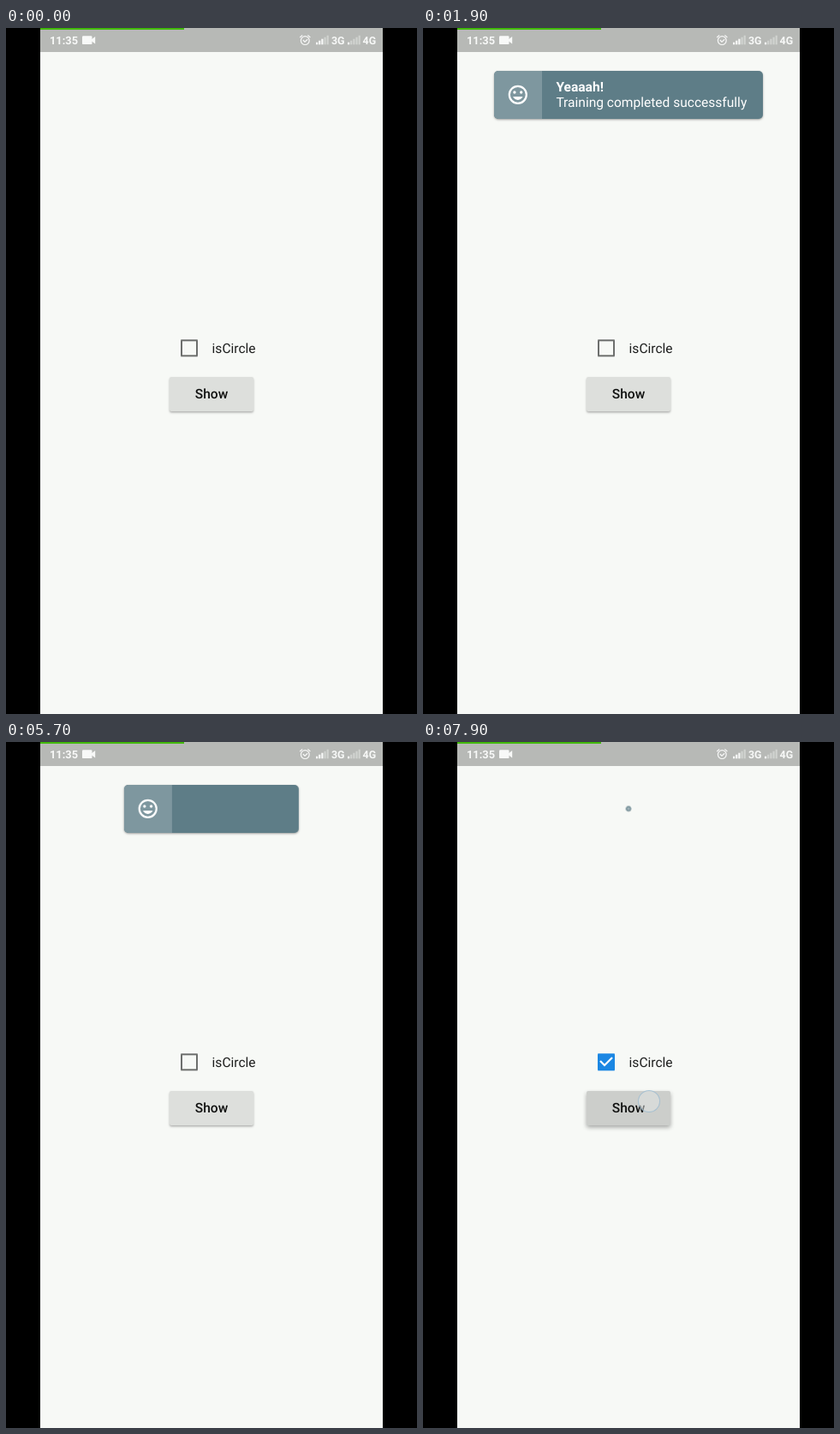
An HTML page for the animation above (8 s loop, 480 px wide and 800 px high).

```html
<!DOCTYPE html>
<html lang="en">
<head>
<meta charset="utf-8">
<title>Achievement popup</title>
<style>
  html, body { margin: 0; width: 100%; height: 100%; overflow: hidden; background: #000; }
  #stage {
    --loop: 8000ms linear infinite;
    position: absolute; left: 0; top: 0; width: 480px; height: 800px; overflow: hidden; background: #000;
    font: 15.556px/18.23px Roboto, sans-serif; color: #1d1e1d; text-rendering: geometricPrecision;
  }
  #stage div { position: absolute; box-sizing: border-box; white-space: nowrap; }
  #stage svg { position: absolute; left: 0; top: 0; }
  #page { left: 40px; top: 0; width: 400px; height: 800px; background: #f7f9f6; }

  #label { left: 240.6px; top: 365px; }
  #box {
    left: 204px; top: 363px; width: 20px; height: 20px; border-radius: 1px;
    border: 2.2px solid #6d6f6d; animation: fill var(--loop);
  }
  #stage #check { left: 204px; top: 363.3px; animation: draw var(--loop); }
  #button {
    left: 191px; top: 406.8px; width: 98px; height: 40px; border-radius: 2px;
    font-weight: 500; line-height: 40px; text-align: center; color: #111211;
    animation: press var(--loop);
  }

  .touch {
    width: 26px; height: 26px; border-radius: 50%; opacity: 0;
    border: 1.5px solid rgba(140, 178, 205, .65); background: rgba(226, 230, 229, .5);
  }
  #tapShow { left: 251px; top: 406px; animation: tapShow var(--loop); }
  #tapBox { left: 203px; top: 358px; animation: tapBox var(--loop); }

  #popup {
    left: 240px; top: 50px; height: 55.6px; background: #5e7d87; color: #fff;
    box-shadow: 0 1px 2.5px rgba(0, 0, 0, .36);
    animation: scale var(--loop), size var(--loop), shape var(--loop);
  }
  #face {
    left: 0; top: 0; width: 55.6px; height: 55.6px; background: #7e979f;
    animation: faceShape var(--loop);
  }
  #title, #subtitle { left: 72.4px; opacity: 0; }
  #title { top: 9.6px; font-weight: 700; animation: title var(--loop); }
  #subtitle { top: 27.8px; animation: subtitle var(--loop); }

  @keyframes scale {
    0%, 7.2% { transform: translateX(-50%) scale(0); animation-timing-function: cubic-bezier(.4, 0, .2, 1); }
    10.3% { transform: translateX(-50%) scale(1); animation-timing-function: linear; }
    73.8% { transform: translateX(-50%) scale(1); animation-timing-function: cubic-bezier(.8, 0, .6, 1); }
    76.9% { transform: translateX(-50%) scale(0); }
    98.25% { transform: translateX(-50%) scale(0); animation-timing-function: ease-in; }
    100% { transform: translateX(-50%) scale(.85); }
  }
  @keyframes size {
    0% { width: 55.6px; }
    10.45% { width: 55.6px; animation-timing-function: cubic-bezier(.4, 0, .2, 1); }
    16.7% { width: 314px; animation-timing-function: linear; }
    67.4% { width: 314px; animation-timing-function: cubic-bezier(.8, 0, .6, 1); }
    73.65%, 100% { width: 55.6px; }
  }
  @keyframes shape {
    0%, 90% { border-radius: 5px; }
    90.01%, 100% { border-radius: 28px; }
  }
  @keyframes faceShape {
    0%, 90% { border-radius: 5px 0 0 5px; }
    90.01%, 100% { border-radius: 28px; }
  }
  @keyframes title {
    0%, 16.75% { opacity: 0; transform: translateY(11.1px); }
    19.9%, 63.9% { opacity: 1; transform: none; }
    67%, 100% { opacity: 0; transform: translateY(11.1px); }
  }
  @keyframes subtitle {
    0%, 19.95% { opacity: 0; transform: translateY(11.1px); }
    23.1%, 60.62% { opacity: 1; transform: none; }
    63.75%, 100% { opacity: 0; transform: translateY(11.1px); }
  }
  @keyframes press {
    0%, 6.1%, 11.9%, 97.3% { background: #dddfdc; box-shadow: 0 1.5px 2.5px rgba(0, 0, 0, .3); }
    7.5%, 9.4%, 98.7%, 100% { background: #cccecb; box-shadow: 0 2.5px 5px rgba(0, 0, 0, .33); }
  }
  @keyframes tapShow {
    0%, 6.1% { opacity: 0; }
    6.11%, 7.5% { opacity: 1; }
    8.75%, 97.3% { opacity: 0; }
    97.31%, 98.8% { opacity: 1; }
    100% { opacity: .1; }
  }
  @keyframes tapBox {
    0%, 87.25% { opacity: 0; }
    87.26%, 88.5% { opacity: 1; }
    89.75%, 100% { opacity: 0; }
  }
  @keyframes fill {
    0%, 87.75% { border-width: 2.2px; border-color: #6d6f6d; transform: translateY(.3px) scale(1); }
    88.3% { border-color: #1b87e3; }
    88.9% { border-width: 10px; transform: translateY(.3px) scale(.9); }
    90%, 100% { border-width: 10px; border-color: #1b87e3; transform: translateY(.3px) scale(1); }
  }
  @keyframes draw {
    0%, 88.89% { stroke-dashoffset: 1; opacity: 0; }
    88.9% { stroke-dashoffset: 1; opacity: 1; }
    90%, 100% { stroke-dashoffset: 0; opacity: 1; }
  }
</style>
</head>
<body>
<div id="stage">
  <div id="page"></div>

  <svg width="480" height="30" fill="#f8f9f8" font-family="Roboto, sans-serif" font-weight="700">
    <path fill="#b7b9b6" d="M40 0h400v28H40z"/>
    <path fill="#43b90c" d="M40 0h168v2H40z"/>
    <text x="51" y="19" font-size="12.8">11:35</text>
    <rect x="89" y="9.3" width="11.5" height="9.8" rx="1.2"/>
    <path d="M99.5 13.6L104.2 10v8.6l-4.7-3.6z"/>
    <g fill="none" stroke="#f8f9f8" stroke-width="1.2">
      <circle cx="349.3" cy="14.6" r="4.9"/>
      <path d="M343.2 11l3-2.6M355.4 11l-3-2.6M346.8 14l2.2 2.2 3.2-3"/>
    </g>
    <g id="bars"></g>
    <text x="380" y="19" font-size="12.4">3G</text>
    <text x="416.6" y="19" font-size="12.4">4G</text>
  </svg>

  <div id="box"></div>
  <svg id="check" width="20" height="20" viewBox="0 0 18 18" fill="none" stroke="#fff" stroke-width="2" stroke-dasharray="1 2">
    <path pathLength="1" d="M2.7 8.1l4.5 4.5 8.1-8.1"/>
  </svg>
  <div id="label">isCircle</div>
  <div id="button">Show</div>

  <div id="popup">
    <div id="face">
      <svg width="55.6" height="55.6" viewBox="-25 -25 50 50" fill="#fff">
        <circle r="9" fill="none" stroke="#fff" stroke-width="2"/>
        <circle cx="-3.5" cy="-2.5" r="1.5"/>
        <circle cx="3.5" cy="-2.5" r="1.5"/>
        <path d="M0 5.5c2.33 0 4.31-1.46 5.11-3.5H-5.11C-4.31 4.04-2.33 5.5 0 5.5z"/>
      </svg>
    </div>
    <div id="title">Yeaaah!</div>
    <div id="subtitle">Training completed successfully</div>
  </div>

  <div id="tapShow" class="touch"></div>
  <div id="tapBox" class="touch"></div>
</div>
<script>
  // Signal strength: five rising bars, the first `lit` of them bright.
  const signal = (x, lit) => [0, 1, 2, 3, 4].map(i => {
    const height = 2.6 + i * 2;
    return `<rect x="${x + i * 3.15}" y="${19.3 - height}" width="2.2" height="${height}" opacity="${i < lit ? 1 : .4}"/>`;
  }).join('');
  document.getElementById('bars').innerHTML = signal(362, 3) + signal(399, 1);
</script>
</body>
</html>
```
